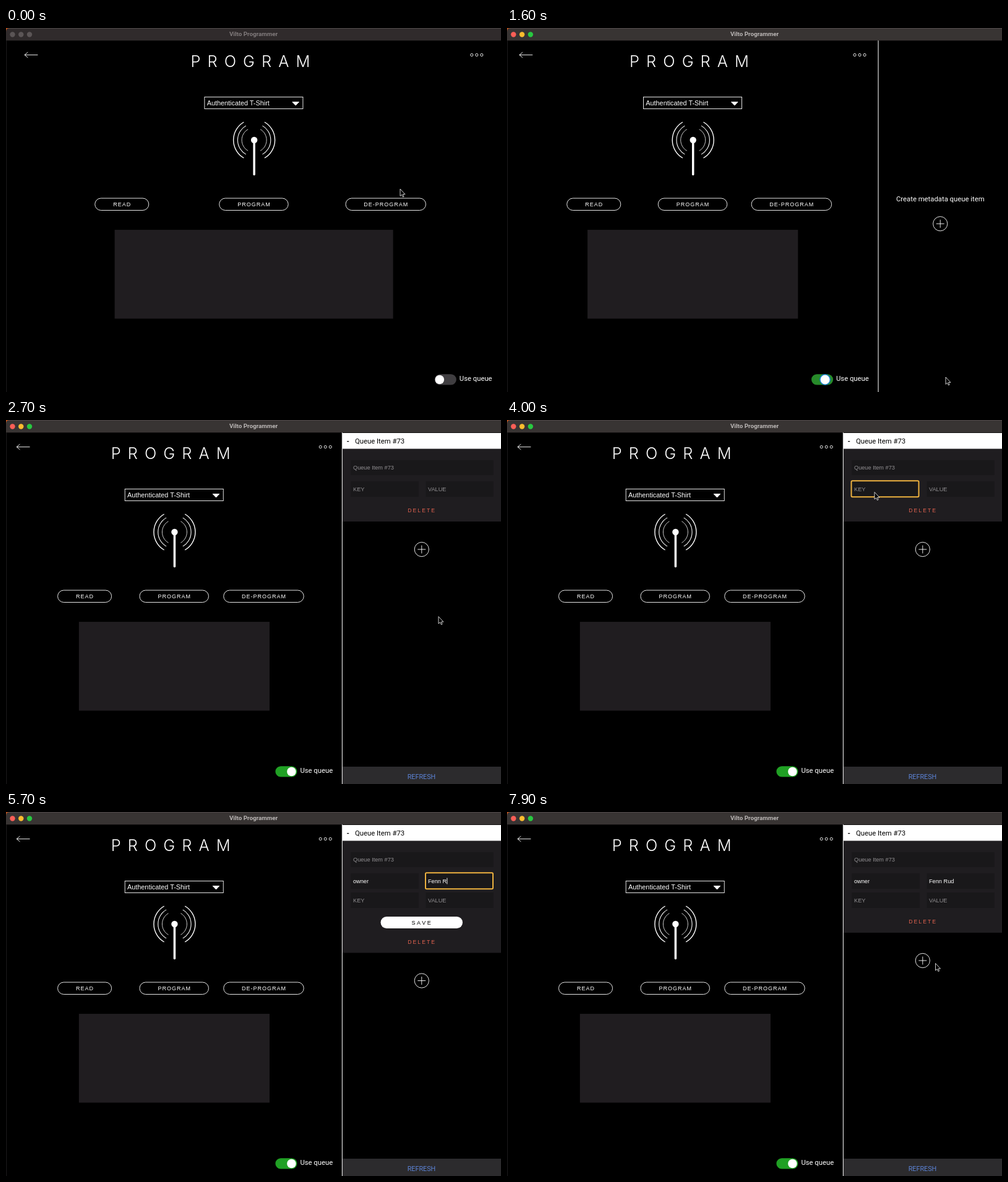
An HTML page that plays this animation: 800 px wide and 588 px high, repeating every 8 s.

```html
<!DOCTYPE html>
<html lang="en">
<head>
<meta charset="utf-8">
<title>Tag programmer</title>
<style>
  html, body { margin: 0; width: 100%; height: 100%; overflow: hidden; background: #000; }
  svg { display: block; width: 800px; height: 588px; }
  text { fill: #fff; font-family: "Liberation Sans", Arial, sans-serif; }
  .ui { font: 11.3px Roboto, sans-serif; }
  .bar { font: 700 9.8px Roboto, sans-serif; }
  .title { font: 300 25.4px Inter, sans-serif; letter-spacing: 11.1px; }
  .button { font-size: 9px; letter-spacing: 1px; }
  .mid { text-anchor: middle; }
  .line { fill: none; stroke: #fff; stroke-width: .9; }
  .input { font-size: 9.2px; fill: #918f92; }
  .field { fill: #19181a; }
</style>
</head>
<body>
<svg viewBox="0 0 800 588">
  <rect width="800" height="588"/>

  <g id="back" class="line" stroke-linecap="round"><path d="M21 43.5H0L5 39.3M0 43.5L5 47.7"/></g>
  <g id="menu" class="line">
    <circle cx="-8" cy="43.5" r="2.1"/><circle cy="43.5" r="2.1"/><circle cx="8" cy="43.5" r="2.1"/>
  </g>

  <g id="center">
    <text class="title mid" y="62.5">PROGRAM</text>
    <rect class="line" x="-79.5" y="111.5" width="159" height="19"/>
    <text x="-75.7" y="125" font-size="10.85">Authenticated T-Shirt</text>
    <path d="M62.5 119.5H73L67.8 125Z" fill="#fff" stroke="#fff" stroke-linejoin="round"/>
    <g id="antenna" transform="translate(.7 181)">
      <circle r="5.2" fill="#fff"/>
      <path d="M0 0V55.5" stroke="#fff" stroke-width="3.5" stroke-linecap="round"/>
    </g>
  </g>
  <g id="buttons"></g>
  <rect id="output" y="326" height="143.5" fill="#201d20"/>

  <g id="queueSwitch">
    <rect id="track" x="-108" y="559.3" width="35" height="17.2" rx="8.6"/>
    <circle id="knob" cy="568" fill="#fff" stroke="#1b7fd0"/>
    <text class="ui" x="-68" y="570">Use queue</text>
  </g>

  <g id="sidebar">
    <path id="divider" d="M0 20V588" stroke="#ddd" stroke-width="1.2"/>
    <text id="hint" class="ui mid" x="700.3" y="280">Create metadata queue item</text>
    <g id="item">
      <rect id="card" x="544" y="46" width="256" fill="#1f1d20"/>
      <rect x="544" y="21" width="256" height="25.5" fill="#fff"/>
      <text class="ui" x="550.5" y="37.5" style="fill:#000;font-weight:700">-</text>
      <text class="ui" x="564" y="37.5" style="fill:#000">Queue Item #73</text>
      <rect class="field" x="557" y="65" width="231" height="24"/>
      <text class="input" x="561" y="79.8">Queue Item #73</text>
      <g id="row"><rect class="field" x="557" y="99" width="110" height="25"/>
        <rect class="field" x="678.5" y="99" width="109.5" height="25"/></g>
      <text id="key" class="input" x="561" y="114.5"></text>
      <text id="value" class="input" x="682" y="114.5"></text>
      <g id="nextRow">
        <use href="#row" y="31"/>
        <text class="input" x="561" y="145.5">KEY</text>
        <text class="input" x="682" y="145.5">VALUE</text>
      </g>
      <rect id="focus" y="98.3" width="109" height="26" rx="1.8" fill="none" stroke="#edb13f" stroke-width="2"/>
      <rect id="caret" y="106.5" width=".9" height="10" fill="#fff"/>
      <g id="save">
        <rect x="605.5" y="169" width="132.5" height="19" rx="9.5" fill="#fff"/>
        <text class="mid" x="672.5" y="182" style="fill:#000;font-size:9px;letter-spacing:2.7px">SAVE</text>
      </g>
      <g id="loader" fill="#fff"></g>
      <text id="remove" class="mid" x="672.2" style="fill:#e2624f;font-size:8.6px;letter-spacing:2.1px">DELETE</text>
      <rect x="544" y="560" width="256" height="28" fill="#2c2b2d"/>
      <text class="mid" x="671.5" y="580" style="fill:#5c83d6;font:10.8px Roboto,sans-serif">REFRESH</text>
    </g>
    <g id="plus" class="line"><circle r="11.6"/><path d="M-6.5 0H6.5M0 -6.5V6.5"/></g>
  </g>

  <rect id="titlebar" width="800" height="20.3"/>
  <path d="M0 .5H800" stroke="#5a5554" stroke-opacity=".7"/>
  <path d="M0 0H6Q0 0 0 6Z" fill="#c4541c"/>
  <path d="M.5 20V588" stroke="#1c1b1c"/>
  <g id="lights"><circle cx="10.5" cy="10.5" r="4.2"/><circle cx="24.3" cy="10.5" r="4.2"/><circle cx="38" cy="10.5" r="4.2"/></g>
  <text id="appName" class="bar mid" x="400" y="13.4">Vilto Programmer</text>

  <path id="cursor" d="M0 0V11.5L2.6 9.2L4.4 13L6.1 12.3L4.4 8.6H8Z" fill="#000" stroke="#fff" stroke-width=".8"/>
</svg>
<script>
const LOOP = 8000, STEP = 100;
const el = {};
document.querySelectorAll('[id]').forEach(node => el[node.id] = node);

const set = (node, attrs) => Object.entries(attrs).forEach(([k, v]) => node.setAttribute(k, v));
const add = (parent, tag, attrs, text = '') => {
  const node = document.createElementNS('http://www.w3.org/2000/svg', tag);
  set(node, attrs);
  node.textContent = text;
  return parent.appendChild(node);
};
const move = (node, x, y = 0) => node.setAttribute('transform', `translate(${x} ${y})`);
const show = (node, on) => { node.style.display = on ? '' : 'none'; };
const clamp = x => Math.min(1, Math.max(0, x));
const smooth = x => x * x * (3 - 2 * x);
const mix = (a, b, p) => a + (b - a) * p;
const at = (table, t) => table.filter(row => row[0] <= t).pop();

// Signal arcs: radius and line weight
[[33.5, 1.4], [26.7, 1.1], [20, .8]].forEach(([r, weight]) => {
  const x = r / 2, y = r * Math.sin(Math.PI / 3);
  for (const side of [-1, 1]) {
    add(el.antenna, 'path', {
      d: `M${side * x} ${-y}A${r} ${r} 0 0 ${side > 0 ? 1 : 0} ${side * x} ${y}`,
      class: 'line', style: `stroke-width:${weight}`
    });
  }
});

// Action buttons: label, width, centre as a share of the main pane
const buttons = [['READ', 87, .2338], ['PROGRAM', 111.5, .5], ['DE-PROGRAM', 129.5, .7664]].map(([label, width, share]) => {
  const node = add(el.buttons, 'g', {});
  add(node, 'rect', { class: 'line', x: -width / 2, y: 275, width, height: 19.5, rx: 9.75 });
  add(node, 'text', { class: 'button mid', x: .5, y: 288 }, label);
  return { node, share };
});
const bars = [663, 669.5, 676].map(x => add(el.loader, 'rect', { x, width: 4.6 }));

const ACTIVATE = 900, TOGGLE = 1400, CREATE = 2700, KEY_FOCUS = 4000, VALUE_FOCUS = 5200, SAVE = 6900, SAVED = 7500;
const paneWidths = [[0, 800.8], [TOGGLE, 600], [CREATE, 543.4]];
// Start time, DELETE centre, card bottom, plus centre
const cardLayouts = [[CREATE, 146, 164, 209], [4500, 210, 227.5, 272.5], [SAVE, 207, 225, 270], [SAVED, 177, 195, 240]];
const keyTyping = [[0, ''], [4500, 'o'], [4600, 'ow'], [4700, 'own'], [4900, 'owne'], [5000, 'owner']];
const valueTyping = [[0, ''], [5300, 'F'], [5400, 'Fe'], [5500, 'Fenn'], [5600, 'Fenn '], [5700, 'Fenn R'], [5800, 'Fenn Ru'], [5900, 'Fenn Rud']];
const pointer = [
  [0, 637, 260], [100, 637, 260], [700, 707, 552], [900, 707, 552], [1100, 709, 564], [1800, 709, 564],
  [2300, 700, 319], [2700, 699, 317.5], [3500, 681, 266], [3900, 594, 116.5], [6200, 594, 116.5],
  [6700, 622.5, 178.5], [7600, 622.5, 178.5], [7900, 692.5, 244.5], [LOOP, 692.5, 244.5]
];

function drawWindow(t) {
  const active = t >= ACTIVATE;
  set(el.titlebar, { fill: active ? '#383433' : '#302b2c' });
  el.appName.style.fill = active ? '#bab6b5' : '#817b7c';
  ['#fc5f57', '#fdbc2e', '#28c840'].forEach((color, i) => set(el.lights.children[i], { fill: active ? color : '#5b5556' }));
}

function drawMain(t, width) {
  move(el.back, width * .05 - 10);
  move(el.menu, width * .95);
  move(el.center, width / 2);
  buttons.forEach(({ node, share }) => move(node, width * share));
  const boxWidth = Math.min(450, width * .567);
  set(el.output, { x: (width - boxWidth) / 2 + .2, width: boxWidth });

  const p = 1 - (1 - clamp((t - TOGGLE) / 400)) ** 2.2;
  const ringed = t >= TOGGLE && t < 2600;
  move(el.queueSwitch, width);
  set(el.knob, { cx: mix(-100, -82, p), r: ringed ? 8.2 : 7.3, 'stroke-width': ringed ? 1.5 : 0 });
  set(el.track, { fill: `rgb(${mix(64, 32, p)},${mix(62, 160, p)},${mix(65, 36, p)})` });
}

function drawText(node, text, placeholder) {
  node.textContent = text || placeholder;
  node.style.fill = text ? '#fff' : '';
}

function drawSidebar(t, width) {
  show(el.sidebar, t >= TOGGLE);
  move(el.divider, width);
  const open = t >= CREATE;
  show(el.hint, !open);
  show(el.item, open);
  if (!open) return move(el.plus, 700.2, 316.2);

  const [, removeY, bottom, plusY] = at(cardLayouts, t);
  move(el.plus, 671.8, plusY);
  set(el.card, { height: bottom - 46 });
  set(el.remove, { y: removeY + 3.2 });

  const key = at(keyTyping, t)[1], value = at(valueTyping, t)[1];
  drawText(el.key, key, 'KEY');
  drawText(el.value, value, 'VALUE');
  show(el.nextRow, key);
  show(el.save, key && t < SAVE);

  const onValue = t >= VALUE_FOCUS;
  const focused = t >= KEY_FOCUS && t < SAVE;
  show(el.focus, focused);
  set(el.focus, { x: onValue ? 678 : 556.5 });
  const [text, start, node] = onValue ? [value, 682, el.value] : [key, 561, el.key];
  show(el.caret, focused && text);
  set(el.caret, { x: start + (text ? node.getComputedTextLength() : 0) + .3 });

  show(el.loader, t >= SAVE && t < SAVED);
  const phase = (t + 100) % 600;
  bars.forEach((bar, i) => {
    const dip = Math.sin(Math.PI * clamp((phase - 100 - i * 100) / 200));
    const height = 8 - 3 * dip;
    set(bar, { y: 177 - height / 2, height });
  });
}

function drawPointer(t) {
  const i = pointer.findIndex(point => point[0] > t);
  const [t0, x0, y0] = pointer[i - 1], [t1, x1, y1] = pointer[i];
  const p = smooth((t - t0) / (t1 - t0));
  move(el.cursor, mix(x0, x1, p), mix(y0, y1, p));
  show(el.cursor, t < 4500 || t >= 6200);
}

function frame() {
  const t = Math.floor(performance.now() % LOOP / STEP) * STEP;
  const width = at(paneWidths, t)[1];
  drawWindow(t);
  drawMain(t, width);
  drawSidebar(t, width);
  drawPointer(t);
  requestAnimationFrame(frame);
}
frame();
</script>
</body>
</html>
```
